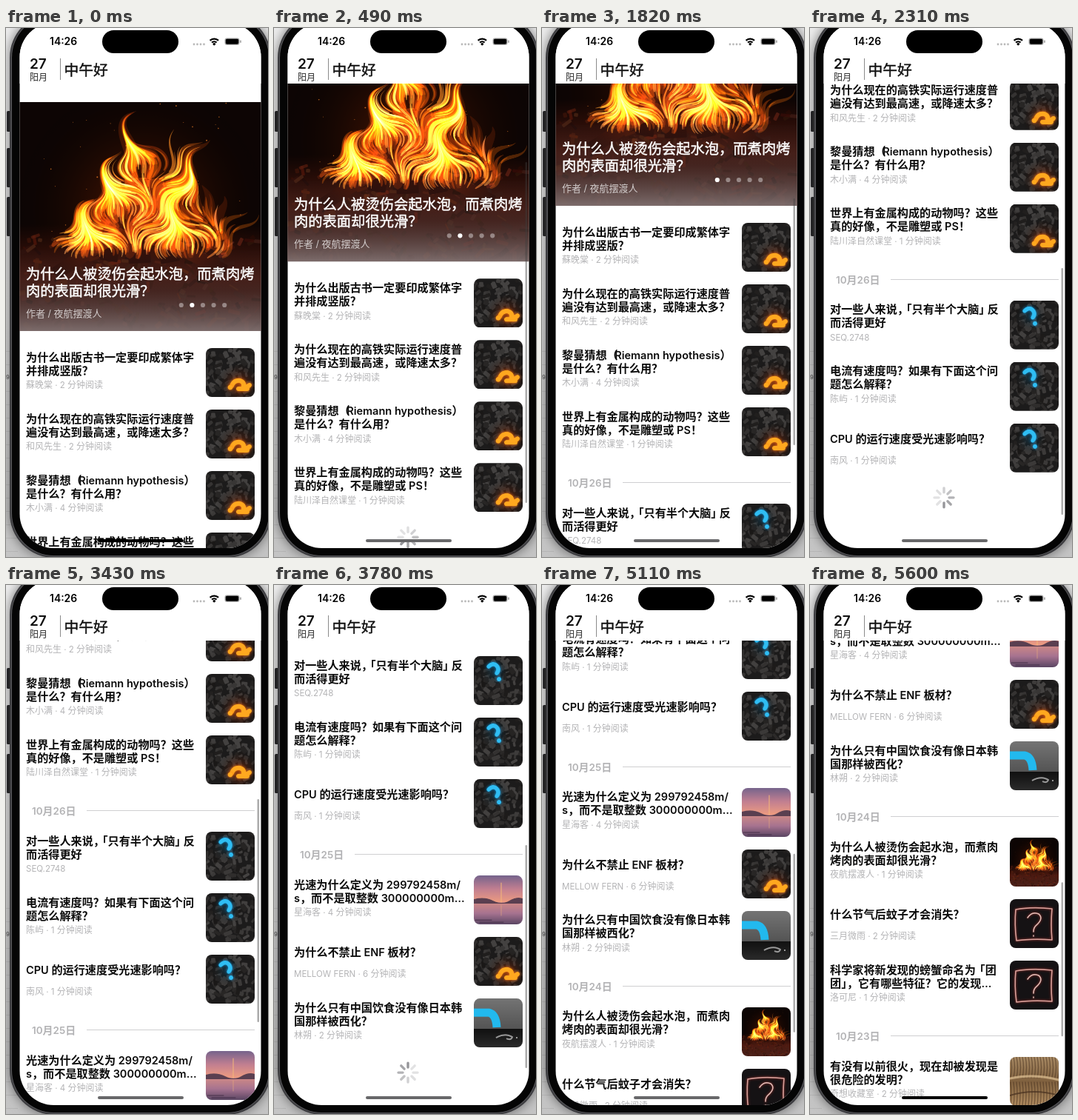
These frames come from a looping animation (354 px wide and 714 px high, 6.79 s). An HTML page with a canvas:

```html
<!DOCTYPE html>
<html lang="zh-CN">
<head>
<meta charset="utf-8">
<style>
html, body { margin: 0; width: 100%; height: 100%; overflow: hidden; background: #ddd; }
canvas { display: block; width: 354px; height: 714px; }
</style>
</head>
<body>
<canvas id="stage"></canvas>
<script>
const W = 354, H = 714, LOOP = 6790, STEP = 70;
const FONT = 'Inter, "Noto Sans CJK SC", "Noto Sans CJK", sans-serif';
const dpr = window.devicePixelRatio || 1;
const stage = document.getElementById('stage');
stage.width = W * dpr;
stage.height = H * dpr;
const ctx = stage.getContext('2d');

// scroll strokes: start, end, from, to, sharpness
const SCROLLS = [
  [70, 1330, 0, 169, 2.95],
  [1820, 2590, 169, 478, 2.69],
  [3430, 4130, 478, 782, 2.9],
  [5040, 5600, 782, 1062, 2.9]
];
const LOADS = [910, 2380, 3850, 5390];
const BAR = { len: [460, 333, 301, 241, 208], top: [150, 171, 164, 138, 209] };

const SECTIONS = [
  { items: [
    ['为什么出版古书一定要印成繁体字', '并排成竖版？', '蘇晚棠', 2, 'amber'],
    ['为什么现在的高铁实际运行速度普', '遍没有达到最高速，或降速太多？', '和风先生', 2, 'amber'],
    ['黎曼猜想（Riemann hypothesis）', '是什么？有什么用？', '木小满', 4, 'amber'],
    ['世界上有金属构成的动物吗？这些', '真的好像，不是雕塑或 PS！', '陆川泽自然课堂', 1, 'amber']
  ] },
  { date: '10月26日', items: [
    ['对一些人来说，「只有半个大脑」反', '而活得更好', 'SEQ.2748', 0, 'blue'],
    ['电流有速度吗？如果有下面这个问', '题怎么解释？', '陈屿', 1, 'blue'],
    ['CPU 的运行速度受光速影响吗？', '', '南风', 1, 'blue']
  ] },
  { date: '10月25日', items: [
    ['光速为什么定义为 299792458m/', 's，而不是取整数 300000000m…', '星海客', 4, 'sunset'],
    ['为什么不禁止 ENF 板材？', '', 'MELLOW FERN', 6, 'amber'],
    ['为什么只有中国饮食没有像日本韩', '国那样被西化？', '林朔', 2, 'wall']
  ] },
  { date: '10月24日', items: [
    ['为什么人被烫伤会起水泡，而煮肉', '烤肉的表面却很光滑？', '夜航摆渡人', 1, 'fire'],
    ['什么节气后蚊子才会消失？', '', '三月微雨', 2, 'neon'],
    ['科学家将新发现的螃蟹命名为「团', '团」，它有哪些特征？它的发现…', '洛可尼', 1, 'neon']
  ] },
  { date: '10月23日', items: [
    ['有没有以前很火，现在却被发现是', '很危险的发明？', '奇想收藏室', 2, 'arch']
  ] }
];
const TIGHT = { '，「': .7, '」反': .25, '为「': .15, '」，': .5, '（R': .3 };

function random(seed) {
  return () => (seed = (seed * 16807) % 2147483647) / 2147483647;
}

function text(str, x, y, size, weight, color, latin = .96) {
  ctx.fillStyle = ctx.strokeStyle = color;
  ctx.lineWidth = .45;
  let prev = '';
  for (const run of str.match(/[\x00-\xff…]+|[^\x00-\xff…]/g)) {
    const cjk = run.charCodeAt(0) > 255 && run !== '…';
    ctx.font = `${weight} ${cjk ? size : size * latin}px ${FONT}`;
    x -= (TIGHT[prev + run[0]] || 0) * size;
    ctx.fillText(run, x, y);
    // a thin outline stands in for the missing medium cut
    if (cjk && weight === 500) ctx.strokeText(run, x, y);
    x += ctx.measureText(run).width;
    prev = run.at(-1);
  }
}

function box(g, x, y, w, h, r, fill) {
  g.beginPath();
  g.roundRect(x, y, w, h, r);
  if (fill) { g.fillStyle = fill; g.fill(); }
}

function disc(g, x, y, r, fill) {
  g.beginPath();
  g.arc(x, y, r, 0, 7);
  g.fillStyle = fill;
  g.fill();
}

function line(g, d, width, color) {
  g.lineWidth = width;
  g.strokeStyle = color;
  g.stroke(new Path2D(d));
}

function fade(g, y0, y1, ...colors) {
  const f = g.createLinearGradient(0, y0, 0, y1);
  colors.forEach((c, i) => f.addColorStop(i / (colors.length - 1), c));
  return f;
}

function glow(g, x, y, r, color) {
  const f = g.createRadialGradient(x, y, 0, x, y, r);
  f.addColorStop(0, color);
  f.addColorStop(1, 'transparent');
  g.fillStyle = f;
  g.fillRect(x - r, y - r, r * 2, r * 2);
}

function picture(w, h, draw) {
  const c = document.createElement('canvas');
  c.width = w * 2;
  c.height = h * 2;
  const g = c.getContext('2d');
  g.scale(2, 2);
  g.lineCap = g.lineJoin = 'round';
  draw(g);
  return c;
}

function chip(g, x, y, a, w, h, fill) {
  g.save();
  g.translate(x, y);
  g.rotate(a);
  box(g, -w / 2, -h / 2, w, h, 1.5, fill);
  g.restore();
}

function rubble(g) {
  const r = random(77);
  g.fillStyle = '#1c1b1b';
  g.fillRect(0, 0, 66, 66);
  for (let i = 0; i < 95; i++) {
    const v = 26 + r() * 44 | 0;
    chip(g, r() * 66, r() * 66, r() * 3, 6 + r() * 6, 3 + r() * 4, `rgb(${v},${v - 2},${v - 3})`);
  }
}

function question(g, curve, x, y, width, color, halo) {
  g.shadowColor = halo;
  g.shadowBlur = 7;
  line(g, curve, width, color);
  disc(g, x, y, width * .55, color);
  g.shadowBlur = 0;
}

// a wisp drifts upward through a swirling field and thins out
function wisp(g, x, y, steps, width, color) {
  const left = [], right = [];
  for (let i = 0; i <= steps; i++) {
    const a = -1.57 + .75 * Math.sin(x * .055 + y * .025) + .7 * Math.sin(y * .085 - x * .045 + 1.3);
    const w = width * Math.sin(Math.PI * Math.pow((i + .5) / (steps + 1), .6));
    const nx = -Math.sin(a) * w, ny = Math.cos(a) * w;
    left.push([x + nx, y + ny]);
    right.unshift([x - nx, y - ny]);
    x += Math.cos(a) * 3.2;
    y += Math.sin(a) * 3.2;
  }
  g.beginPath();
  for (const p of left.concat(right)) g.lineTo(...p);
  g.fillStyle = color;
  g.fill();
}

function fire(g) {
  const r = random(4242);
  g.fillStyle = '#0d0504';
  g.fillRect(0, 0, 327, 309);
  glow(g, 165, 145, 175, 'rgba(125,36,4,.7)');
  g.fillStyle = fade(g, 165, 309, 'rgba(70,20,10,0)', '#4c1a11', '#4a211a');
  g.fillRect(0, 165, 327, 144);
  // embers
  for (let i = 0; i < 260; i++) {
    chip(g, r() * 327, 180 + r() * 125, r() * 3, 5 + r() * 13, 2 + r() * 5,
      `hsla(${6 + r() * 14},${45 + r() * 35}%,${8 + r() * 20}%,.65)`);
  }
  // logs
  const logs = [[128, 165, 100, 24, .15], [160, 160, 115, 30, -.05], [193, 160, 115, 26, -.2],
    [90, 205, 100, 18, 1], [238, 208, 90, 18, -1.1]];
  for (const [x, y, h, w, a] of logs) {
    chip(g, x, y, a, w, h, fade(g, -h / 2, h / 2, '#8a2f09', '#4c170b', '#2c0d08'));
  }
  // flames: tall in the middle, shorter and sparse at the sides
  g.globalCompositeOperation = 'lighter';
  const blaze = (count, width, steps, color) => {
    for (let i = 0; i < count; i++) {
      const x = 35 + (r() + r()) * 132, near = Math.max(.25, 1 - Math.abs(x - 175) / 130);
      const y = 212 - r() * 150 * near;
      wisp(g, x, y, (.4 + r() * .6) * steps * (.6 + near * .5) | 0, width * (.4 + r()), color());
    }
  };
  blaze(120, 7, 28, () => `hsla(${14 + r() * 10},95%,${25 + r() * 15}%,.22)`);
  blaze(190, 3, 26, () => `hsla(${18 + r() * 12},95%,${40 + r() * 12}%,.32)`);
  blaze(230, 1.3, 22, () => `hsla(${26 + r() * 14},95%,${55 + r() * 12}%,.55)`);
  for (let i = 0; i < 45; i++) {
    disc(g, 30 + r() * 270, r() * 190, .4 + r() * .6, 'rgba(255,140,40,.6)');
  }
  g.globalCompositeOperation = 'source-over';
}

const ART = {
  amber(g) {
    rubble(g);
    glow(g, 45, 49, 30, 'rgba(190,60,12,.6)');
    question(g, 'M35 51Q38 43 46 44Q52 46 51 51Q55 54 59 50M44 55H56', 33, 53, 6, '#ffa81f', '#ff7a10');
  },
  blue(g) {
    rubble(g);
    glow(g, 28, 20, 22, 'rgba(20,100,140,.4)');
    question(g, 'M20 14Q26 8 31 13Q35 18 31 23', 34, 31, 5.4, '#2fbdf3', '#0890d8');
  },
  sunset(g) {
    g.fillStyle = fade(g, 0, 36, '#76648c', '#c17f91', '#ee9c80');
    g.fillRect(0, 0, 66, 36);
    g.fillStyle = fade(g, 36, 66, '#d08a86', '#a77390', '#5b4663');
    g.fillRect(0, 36, 66, 30);
    g.fillStyle = '#5a3f50';
    g.fill(new Path2D('M0 32Q14 28 26 34T48 34T66 31V38H0Z'));
    line(g, 'M37 10V36', 1, '#f5b878');
    line(g, 'M37 40V54', 1, 'rgba(245,184,120,.5)');
    line(g, 'M2 60H24M8 63H40', 1, 'rgba(50,32,55,.7)');
  },
  wall(g) {
    g.fillStyle = fade(g, 0, 40, '#747474', '#555');
    g.fillRect(0, 0, 66, 41);
    g.fillStyle = fade(g, 41, 66, '#111', '#2b2b2b');
    g.fillRect(0, 41, 66, 25);
    g.lineCap = 'butt';
    line(g, 'M-2 19L20 19Q30 21 31 39', 11, '#22b9ee');
    line(g, 'M30 53Q42 46 52 52Q50 57 44 54M57 53h2', 2, '#999');
  },
  fire(g) {
    g.scale(66 / 309, 66 / 309);
    g.translate(-9, 0);
    fire(g);
  },
  neon(g) {
    g.fillStyle = '#151214';
    g.fillRect(0, 0, 66, 66);
    g.shadowColor = '#a83630';
    g.shadowBlur = 6;
    line(g, 'M8 14Q30 10 57 13Q55 34 57 55Q32 53 9 56Q6 34 8 14', 1.6, '#d9a09a');
    line(g, 'M24 25Q30 16 39 20Q46 26 36 35Q32 38 32 44M32 49v1', 1.6, '#e2bab4');
  },
  arch(g) {
    g.fillStyle = fade(g, 0, 66, '#a88a64', '#80613f', '#b08c60');
    g.fillRect(0, 0, 66, 66);
    for (let x = 1; x < 66; x += 4) {
      line(g, `M${x} 0q3 14 0 28M${x} 34q2 16 0 32`, 1.3, 'rgba(64,42,26,.5)');
    }
    line(g, 'M0 29Q33 22 66 31', 3, 'rgba(225,195,150,.7)');
    line(g, 'M0 52Q33 42 66 52', 2, 'rgba(70,48,30,.7)');
  }
};

const hero = picture(327, 309, fire);
const thumbs = {};
for (const name in ART) thumbs[name] = picture(66, 66, ART[name]);

function scrollAt(t) {
  let s = 0;
  for (const [a, b, from, to, q] of SCROLLS) {
    if (t < a) break;
    const u = Math.min(1, (t - a) / (b - a));
    s = from + (to - from) * (1 - Math.pow(1 - Math.pow(u, 1.3), q));
  }
  return s;
}

function drawHero(y, active) {
  ctx.drawImage(hero, 18, y, 327, 309);
  ctx.fillStyle = fade(ctx, y + 200, y + 309, 'rgba(45,30,28,.1)', 'rgba(62,46,45,.5)', 'rgba(130,116,116,.9)');
  ctx.fillRect(18, y + 200, 327, 109);
  text('为什么人被烫伤会起水泡，而煮肉烤', 27, y + 239, 19.3, 500, '#fff');
  text('肉的表面却很光滑？', 27, y + 262, 19.3, 500, '#fff');
  text('作者 / 夜航摆渡人', 27, y + 289.5, 13, 400, 'rgba(255,255,255,.72)');
  for (let i = 0; i < 5; i++) {
    disc(ctx, 236.8 + i * 14.6, y + 274, 3.1, i === active ? '#fff' : 'rgba(255,255,255,.4)');
  }
}

function drawItem([a, b, author, mins, art], y) {
  if (b) {
    text(a, 27, y + 17.5, 15.15, 600, '#0b0b0b');
    text(b, 27, y + 35.5, 15.15, 600, '#0b0b0b');
  } else {
    text(a, 27, y + 26, 15.15, 600, '#0b0b0b');
  }
  text(mins ? `${author} · ${mins} 分钟阅读` : author, 27, y + 54.3, 12, 400, '#b4b4b6');
  ctx.save();
  box(ctx, 270, y, 66, 66, 8);
  ctx.clip();
  ctx.drawImage(thumbs[art], 270, y, 66, 66);
  ctx.restore();
}

function drawSpinner(y, t) {
  const head = Math.floor(t / 125);
  ctx.lineCap = 'round';
  for (let i = 0; i < 8; i++) {
    const a = i * Math.PI / 4, c = Math.cos(a), s = Math.sin(a);
    const age = (head - i + 800) % 8;
    line(ctx, `M${181 + c * 7} ${y + s * 7}L${181 + c * 13} ${y + s * 13}`, 3.4,
      `rgba(110,110,115,${Math.max(.2, .72 - age * .1)})`);
  }
}

function drawFeed(t, s) {
  const pages = 1 + LOADS.filter(l => t >= l).length;
  ctx.save();
  ctx.beginPath();
  ctx.rect(18, 75, 327, 630);
  ctx.clip();
  if (s < 340) drawHero(100 - s, pages > 1 ? 0 : 1);
  let y = 432 - s;
  for (const { date, items } of SECTIONS.slice(0, pages)) {
    if (date) {
      text(date, 35, y + 24, 14, 600, '#b3b3b5');
      ctx.fillStyle = '#cfcfd1';
      ctx.fillRect(109, Math.round(y + 18), 227, 1);
      y += 47;
    }
    for (const item of items) {
      if (y > 0 && y < H) drawItem(item, y);
      y += 83;
    }
  }
  if (pages < 5) drawSpinner(y + 17, t);
  if (s > 0) {
    const len = BAR.len[pages - 1], top = BAR.top[pages - 1];
    const part = Math.min(1, s / (142 + 296 * (pages - 1)));
    box(ctx, 339.5, top + (657 - len - top) * part, 2.6, len, 1.3, 'rgba(60,60,60,.42)');
  }
  ctx.restore();
}

function drawHeader() {
  ctx.fillStyle = '#fff';
  ctx.fillRect(18, -8, 327, 83);
  text('14:26', 59, 23.4, 14.5, 600, '#000');
  box(ctx, 130, 3, 103, 31, 15.5, '#000');
  for (let i = 0; i < 4; i++) disc(ctx, 254 + i * 4.5, 22, 1.4, '#b9b9b9');
  ctx.lineCap = 'butt';
  for (const r of [4.7, 8.4]) {
    ctx.beginPath();
    ctx.arc(281.3, 23, r, -2.32, -.82);
    ctx.lineWidth = 2.3;
    ctx.strokeStyle = '#000';
    ctx.stroke();
  }
  disc(ctx, 281.3, 21.8, 1.8, '#000');
  box(ctx, 295.5, 13.5, 20, 9.5, 3, '#aaa');
  box(ctx, 296.8, 14.8, 17.4, 6.9, 1.8, '#000');
  box(ctx, 316.3, 16.5, 1.4, 3.6, 1, '#999');
  text('27', 32, 55, 19, 600, '#111', 1);
  text('阳月', 32, 71, 12, 400, '#222');
  ctx.fillStyle = '#8a8a8a';
  ctx.fillRect(73, 41, 1, 29);
  text('中午好', 78.5, 64, 19.8, 500, '#111');
}

function drawPhone() {
  ctx.fillStyle = fade(ctx, 0, H, '#eee', '#dedede', '#c4c4c4');
  ctx.fillRect(0, 0, W, H);
  ctx.fillStyle = 'rgba(0,0,0,.08)';
  for (let y = 436; y < H; y += 18) ctx.fillRect(0, y, 16, 1);
  text('9', 0, 474, 8, 400, '#555');
  for (const [y, h] of [[112, 28], [162, 53], [228, 53]]) box(ctx, 1, y, 6, h, 1.5, '#2b2b2d');
  ctx.save();
  ctx.shadowColor = 'rgba(0,0,0,.5)';
  ctx.shadowBlur = 16 * dpr;
  box(ctx, 5, -20, 353, 735, 60, '#3c3c3f');
  ctx.restore();
  box(ctx, 7, -18, 349, 731, 58, '#58585b');
  box(ctx, 8, -17, 347, 729, 57, '#050505');
}

function draw(now) {
  const t = Math.floor((now % LOOP) / STEP) * STEP;
  const s = scrollAt(t);
  ctx.setTransform(dpr, 0, 0, dpr, 0, 0);
  drawPhone();
  ctx.save();
  box(ctx, 18.5, -7, 326, 709, 46, '#fff');
  ctx.clip();
  drawFeed(t, s);
  drawHeader();
  box(ctx, 124, 690, 116, 4, 2, s < 60 || s > 1050 ? '#000' : '#68686a');
  ctx.restore();
}

const start = performance.now();
function tick() {
  draw(performance.now() - start);
  requestAnimationFrame(tick);
}
tick();
</script>
</body>
</html>
```
